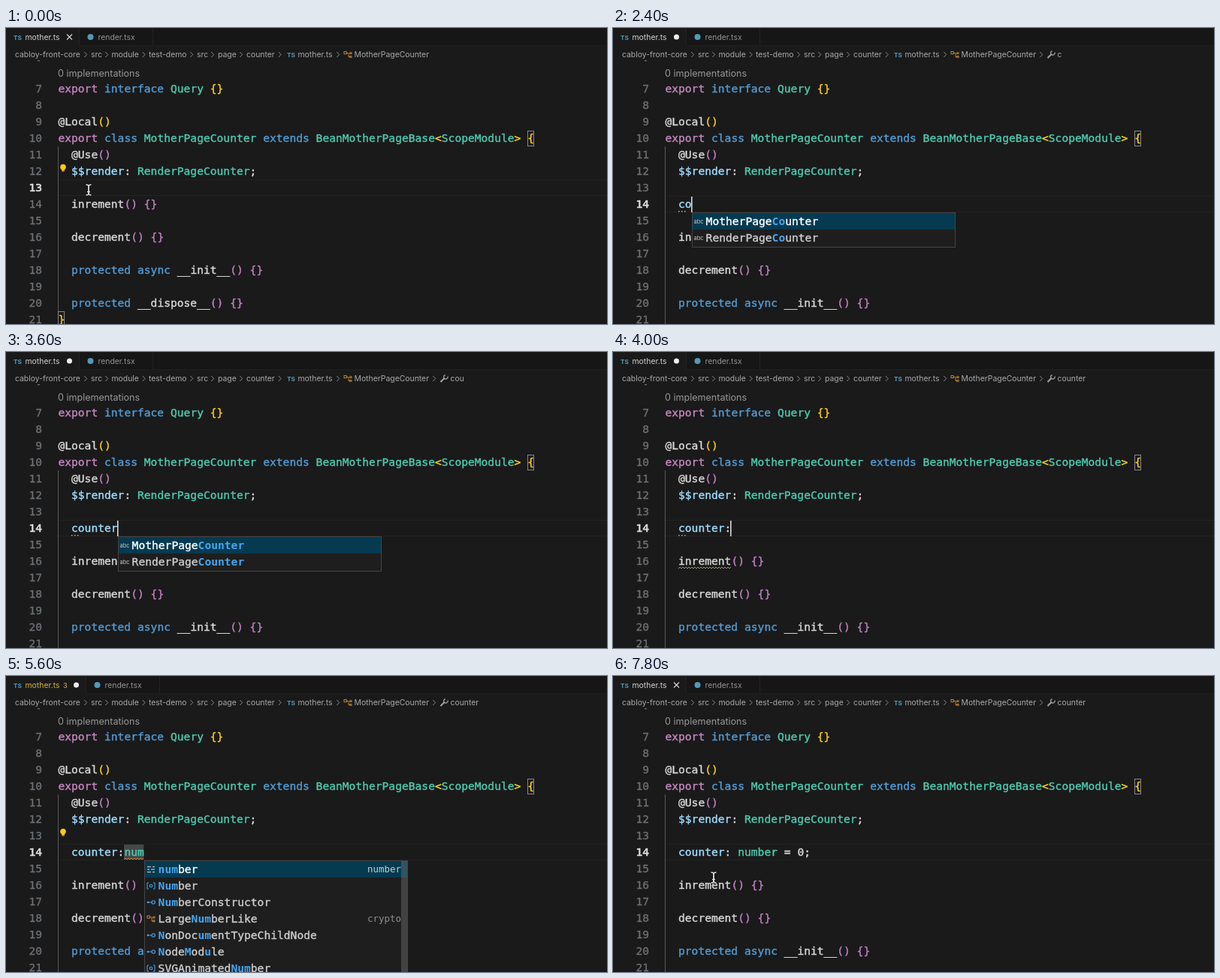
Recreate the animation shown at these times as an HTML page with a canvas. Size 800 by 395 pixels, loop 8 s.

```html
<!DOCTYPE html>
<html lang="en">
<head>
<meta charset="utf-8">
<title>Editor typing</title>
<style>
html, body { margin: 0; width: 100%; height: 100%; overflow: hidden; background: #1a1a1a; }
canvas { display: block; width: 800px; height: 395px; }
</style>
</head>
<body>
<canvas id="stage" width="800" height="395"></canvas>
<script>
const ctx = document.getElementById('stage').getContext('2d');
const LOOP = 8000, STEP = 200;
const CW = 8.8, ROW = 22, LEFT = 69, BASE = 15.5;
const MONO = '14.62px "DejaVu Sans Mono", monospace';
const MONO_BOLD = 'bold ' + MONO;
const DETAIL = '12.45px "DejaVu Sans Mono", monospace';
const ui = (size, weight = 400) => `${weight} ${size}px Inter, sans-serif`;
const C = {
  bg: '#1a1a1a', bar: '#161616', text: '#d6d6d6', dim: '#a8a8a8', num: '#6e7276',
  pink: '#c586c0', blue: '#529ad2', teal: '#4ec9b0', sky: '#9cdcfe',
  gold: '#fbcb1b', violet: '#c07fc0', hit: '#45a6f0', orange: '#d08c38', ts: '#519aba'
};

const HEAD = ['export interface Query {}', '', '@Local()',
  'export class MotherPageCounter extends BeanMotherPageBase<ScopeModule> {',
  '  @Use()', '  $$render: RenderPageCounter;', ''];
const TAIL = ['  inrement() {}', '', '  decrement() {}', '',
  '  protected async __init__() {}', '', '  protected __dispose__() {}', '}'];

const WORDS = [['word', 'MotherPageCounter'], ['word', 'RenderPageCounter']];
const TYPES = [['key', 'number', 'number'], ['var', 'Number'], ['iface', 'NumberConstructor'],
  ['class', 'LargeNumberLike', 'crypto'], ['iface', 'NonDocumentTypeChildNode'],
  ['iface', 'NodeModule'], ['var', 'SVGAnimatedNumber']];

// Editor state changes; "edit" restarts the caret blink.
const START = { text: '', extra: 0, line: 13, dirty: false, bulb: 12, crumb: '', popup: null,
  mouse: [110, 216], caret: false, problems: false, hint: false, warn: false, mark: 0, edit: 0 };
const EVENTS = [
  [400, { mouse: null, caret: true, edit: 400 }],
  [600, { extra: 1, line: 14, dirty: true, edit: 600 }],
  [800, { extra: 2, line: 15, edit: 800 }],
  [1200, { line: 14, edit: 1200 }],
  [1400, { bulb: 13 }],
  [1800, { text: 'c', bulb: 0, edit: 1800 }],
  [2000, { popup: WORDS }],
  [2200, { crumb: 'c', hint: true }],
  [2400, { text: 'co', edit: 2400 }],
  [2800, { text: 'cou', edit: 2800 }],
  [3200, { text: 'coun', edit: 3200 }],
  [3400, { text: 'count', crumb: 'cou', edit: 3400 }],
  [3600, { text: 'counter', edit: 3600 }],
  [3800, { text: 'counter:', popup: null, crumb: 'counter', edit: 3800 }],
  [4000, { warn: true }],
  [4400, { problems: true }],
  [4600, { text: 'counter:n', edit: 4600 }],
  [4800, { text: 'counter:nu', popup: TYPES, edit: 4800 }],
  [5000, { text: 'counter:num', warn: false, hint: false, edit: 5000 }],
  [5400, { bulb: 13, mark: 3 }],
  [5700, { text: 'counter:number', popup: null, mark: 6, edit: 5700 }],
  [6200, { problems: false }],
  [6500, { text: 'counter:number=', bulb: 0, mark: 0, edit: 6500 }],
  [6700, { text: 'counter:number=0', edit: 6700 }],
  [7000, { text: 'counter:number=0;', edit: 7000 }],
  [7300, { text: 'counter: number = 0;', dirty: false, edit: 7300 }],
  [7600, { mouse: [141, 312] }],
  [7800, { mouse: [134, 269] }]
];

const rowTop = n => 70 + ROW * (n - 7);

function rect(x, y, w, h, color) {
  ctx.fillStyle = color;
  ctx.fillRect(x, y, w, h);
}

function write(str, x, y, color, font, align = 'left') {
  ctx.font = font;
  ctx.fillStyle = color;
  ctx.textAlign = align;
  ctx.fillText(str, x, y);
}

// Code text with a hairline outline for a slightly heavier weight.
function mono(str, x, y, color, align = 'left', weight = .4) {
  write(str, x, y, color, MONO, align);
  ctx.strokeStyle = color;
  ctx.lineWidth = weight;
  ctx.strokeText(str, x, y);
}

function poly(points, color, width = 1) {
  ctx.strokeStyle = color;
  ctx.lineWidth = width;
  ctx.beginPath();
  points.forEach(([x, y], i) => i ? ctx.lineTo(x, y) : ctx.moveTo(x, y));
  ctx.stroke();
}

function frame(x, y, w, h, color) {
  ctx.strokeStyle = color;
  ctx.lineWidth = 1;
  ctx.strokeRect(x + .5, y + .5, w - 1, h - 1);
}

function disc(x, y, r, color) {
  ctx.fillStyle = color;
  ctx.beginPath();
  ctx.arc(x, y, r, 0, 7);
  ctx.fill();
}

function ring(x, y, r, color) {
  ctx.strokeStyle = color;
  ctx.lineWidth = 1.1;
  ctx.beginPath();
  ctx.arc(x, y, r, 0, 7);
  ctx.stroke();
}

function squiggle(x, y, w, color) {
  const pts = [];
  for (let i = 0; i <= w; i += 2) pts.push([x + i, y + (i / 2 % 2 ? -1 : 1)]);
  poly(pts, color);
}

const TOKEN = /(@\w+)|\b(export)\b|\b(interface|class|extends|protected|async)\b|\b([A-Z]\w*|n\w*)\b|(\$\$\w+|\bc\w*)|([(){}<>]+)|(\w+|\s+|[^\w\s])/g;

function code(str, n) {
  const y = rowTop(n) + BASE;
  const bracket = str[0] === ' ' ? C.violet : C.gold;
  const colors = [C.text, C.pink, C.blue, C.teal, C.sky, bracket, C.text];
  for (const m of str.matchAll(TOKEN)) {
    const kind = m.slice(1).findIndex(Boolean);
    mono(m[0], LEFT + .4 + m.index * CW, y, colors[kind]);
  }
}

function classIcon(x, y) {
  poly([[x - 2, y - 2], [x + 1, y - 2], [x + 1, y + 3], [x + 3, y + 3]], C.orange, .9);
  ctx.strokeStyle = C.orange;
  ctx.lineWidth = .9;
  ctx.strokeRect(x - 5, y - 4, 3.2, 3.2);
  ctx.strokeRect(x + 2.8, y - 2.8, 2.2, 1.8);
  ctx.strokeRect(x + 2.8, y + 2, 2.2, 1.8);
}

function wrench(x, y) {
  const color = '#a4a4a4';
  poly([[x - 4.5, y + 4.5], [x + 1, y - 1]], color, 2);
  ctx.strokeStyle = color;
  ctx.lineWidth = 1.2;
  ctx.beginPath();
  ctx.arc(x + 2.4, y - 2.2, 2.7, -.3, 4.5);
  ctx.stroke();
}

function itemIcon(kind, x, y) {
  if (kind === 'word') write('abc', x, y + 2.5, '#c5c5c5', ui(7.5), 'center');
  if (kind === 'class') classIcon(x, y);
  if (kind === 'iface') {
    ring(x + 3.2, y, 2.2, C.hit);
    poly([[x - 3, y], [x + 1, y]], C.hit);
    disc(x - 4, y, 1.3, C.hit);
  }
  if (kind === 'var') {
    poly([[x - 3, y - 4], [x - 5, y - 4], [x - 5, y + 4], [x - 3, y + 4]], C.hit);
    poly([[x + 3, y - 4], [x + 5, y - 4], [x + 5, y + 4], [x + 3, y + 4]], C.hit);
    ring(x, y, 1.8, C.hit);
  }
  if (kind === 'key') {
    for (const dy of [-3.5, 0, 3.5]) {
      rect(x - 5, y + dy - .5, dy ? 5 : 3, 1.2, '#c5c5c5');
      rect(x + (dy ? 2 : 0), y + dy - .5, dy ? 3 : 5, 1.2, '#c5c5c5');
    }
  }
}

// Indices of matched letters: a whole run first, else scattered, else last two swapped.
function hits(word, query) {
  const w = word.toLowerCase();
  const at = w.indexOf(query);
  if (at >= 0) return [...query].map((_, i) => at + i);
  const scatter = q => {
    let p = -1;
    return [...q].map(ch => p < -1 ? -2 : (p = w.indexOf(ch, p + 1), p < 0 ? p = -2 : p));
  };
  const found = scatter(query);
  return found.includes(-2) ? scatter(query[0] + query[2] + query[1]) : found;
}

function popup(items, query, x, y) {
  const h = items.length * ROW + 3;
  rect(x, y, 351, h, '#1e1e1e');
  rect(x + 1, y + 1, 349, ROW, '#053a50');
  items.forEach(([kind, word, detail], i) => {
    const top = y + 1 + i * ROW;
    const marked = hits(word, query);
    itemIcon(kind, x + 9, top + 11);
    [...word].forEach((ch, k) => {
      const cx = x + 18.6 + k * CW;
      if (marked.includes(k)) write(ch, cx, top + BASE, C.hit, MONO_BOLD);
      else mono(ch, cx, top + BASE, i ? '#cccccc' : '#ffffff');
    });
    if (detail) write(detail, x + 342, top + 14.5, i ? '#8f8f8f' : '#c8d0d4', DETAIL, 'right');
  });
  if (items === TYPES) rect(x + 342, y + 1, 8, h, 'rgba(121,121,121,.4)');
  frame(x, y, 351, h, '#454545');
}

function bulb(n) {
  const y = rowTop(n) + 6;
  disc(76, y - .5, 3.8, '#fbc91a');
  rect(74, y + 1.5, 4, 3, '#fbc91a');
  rect(74.5, y + 4.5, 3, 1.2, '#c39a18');
}

function pointer([x, y]) {
  const beam = [[[x - 3.5, y - 7], [x - 1, y - 6.5], [x, y - 5], [x, y + 5], [x - 1, y + 6.5], [x - 3.5, y + 7]],
    [[x + 3.5, y - 7], [x + 1, y - 6.5], [x, y - 5], [x, y + 5], [x + 1, y + 6.5], [x + 3.5, y + 7]],
    [[x - 2, y + 2.5], [x + 2, y + 2.5]]];
  beam.forEach(p => poly(p, '#111111', 3));
  beam.forEach(p => poly(p, '#dddddd', 1.4));
}

function tabs(s) {
  const shift = s.problems ? 9 : 0;
  rect(0, 0, 800, 24, C.bar);
  rect(0, 0, 97 + shift, 24, C.bg);
  rect(97 + shift, 0, 1, 24, '#222222');
  rect(195 + shift, 0, 1, 24, '#222222');
  rect(97 + shift, 23, 703 - shift, 1, '#202020');
  write('TS', 10, 15.5, C.ts, ui(8.2, 700));
  write('mother.ts', 25.5, 16, s.problems ? '#d9b13d' : '#d0d0d0', ui(10.4));
  if (s.problems) write('3', 76, 16, '#d9b13d', ui(9.2));
  const x = 84.5 + shift;
  if (s.dirty) disc(x, 12, 3.5, '#eeeeee');
  else {
    poly([[x - 3.5, 8.5], [x + 3.5, 15.5]], '#dddddd', 1.1);
    poly([[x + 3.5, 8.5], [x - 3.5, 15.5]], '#dddddd', 1.1);
  }
  disc(112.5 + shift, 12, 4, C.ts);
  write('render.tsx', 122.5 + shift, 16, '#929292', ui(10.4));
}

function breadcrumb(s) {
  const put = (str, x) => write(str, x, 39, C.dim, ui(10.4));
  const arrow = x => poly([[x - 1.7, 32], [x + 1.7, 35.5], [x - 1.7, 39]], '#8a8a8a');
  [['cabloy-front-core', 12], ['src', 113], ['module', 140.5], ['test-demo', 190], ['src', 254],
    ['page', 282], ['counter', 320], ['mother.ts', 388.5], ['MotherPageCounter', 463.5]]
    .forEach(([str, x]) => put(str, x));
  [106, 134, 183.5, 247, 275, 313, 364.5, 442].forEach(arrow);
  write('TS', 374, 38.5, C.ts, ui(8.2, 700));
  classIcon(455, 35.5);
  if (s.crumb) {
    arrow(570);
    wrench(583, 35.5);
    put(s.crumb, 591.5);
  }
}

function draw(t) {
  const s = Object.assign({}, START, ...EVENTS.filter(e => e[0] <= t).map(e => e[1]));
  rect(0, 0, 800, 395, C.bg);
  tabs(s);
  breadcrumb(s);
  rect(42, 43, 3, 1.2, '#777777');
  write('0 implementations', LEFT, 65, '#989898', ui(12.55));

  const top = rowTop(s.line);
  rect(LEFT, top, 731, 1, '#232323');
  rect(LEFT, top + ROW - 1, 731, 1, '#232323');

  const lines = [...HEAD];
  if (s.extra > 0) lines.push('  ' + s.text);
  if (s.extra > 1) lines.push('');
  lines.push(...TAIL);
  const end = 7 + lines.length - 1;
  rect(LEFT, rowTop(11), 1, rowTop(end) - rowTop(11), '#585858');

  frame(694, 137, 9, 21, '#888888');
  if (end === 21) frame(LEFT, rowTop(21), 9, 21, '#888888');
  if (s.mark) rect(157, 225, s.mark * CW, 20, '#454848');

  lines.forEach((str, i) => {
    const n = 7 + i;
    if (n > 21) return;
    const here = n === s.line;
    mono(n, 48, rowTop(n) + BASE, here ? '#dddddd' : C.num, 'right', here ? .7 : .3);
    code(str, n);
  });

  if (s.hint) for (const x of [87, 91, 95]) rect(x, 244, 1.5, 1.5, '#b0b0b0');
  if (s.warn) squiggle(87, 288, 70, '#9a967c');
  if (s.mark === 3) squiggle(157, 244, 27, '#d1863c');
  if (s.bulb) bulb(s.bulb);

  const x = 87 + s.text.length * CW;
  if (s.caret && (t - s.edit) % 1000 < 500) {
    rect(Math.round(s.line === 14 ? x : 87) - 1, top + 1, 1.6, 21, '#d8d8d8');
  }
  if (s.popup) popup(s.popup, s.text.split(':').pop(), Math.round(x), 246);
  if (s.mouse) pointer(s.mouse);
}

function tick() {
  const t = performance.now() % LOOP;
  draw(Math.floor(t / STEP) * STEP);
  requestAnimationFrame(tick);
}
tick();
</script>
</body>
</html>
```
